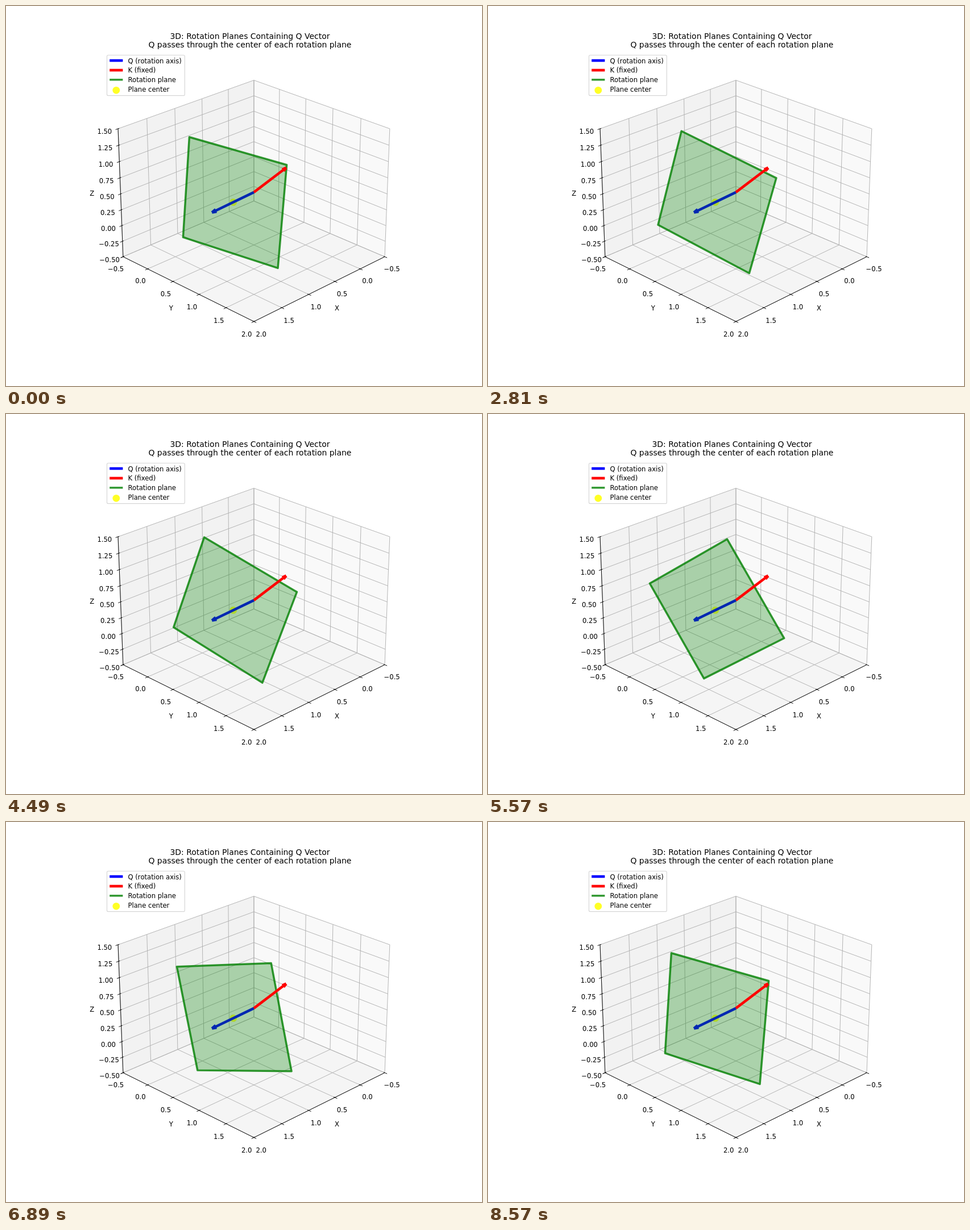
Write an HTML page that moves like this. It is 837 by 669 pixels and loops after 9690 ms.

```html
<!DOCTYPE html>
<html lang="en">
<head>
<meta charset="utf-8">
<title>Rotation planes</title>
<style>
  html, body { margin: 0; width: 100%; height: 100%; overflow: hidden; background: #fff; }
  svg { display: block; width: 837px; height: 669px; }
  text { font: 11.625px "DejaVu Sans", sans-serif; fill: #000; }
  .mid { text-anchor: middle; }
  .title { font-size: 13.95px; text-anchor: middle; }
  .grid { fill: none; stroke: #b0b0b0; stroke-width: .93; }
  .axis { fill: none; stroke: #000; stroke-width: .93; }
  .arrow { fill: none; stroke-width: 4.65; }
  .edge { fill: none; stroke: #008000; stroke-opacity: .8; stroke-width: 3.49; stroke-linejoin: round; }
</style>
</head>
<body>
<svg id="stage" viewBox="0 0 837 669"></svg>
<script>
const stage = document.getElementById('stage');
const LO = -0.5, HI = 2, TOP = 1.5;
const ELEV = 25 * Math.PI / 180, SIN = Math.sin(ELEV), COS = Math.cos(ELEV);
const Q = [1, 0.2, 0.1], K = [0, 0.62, 0.61];

function add(tag, attrs, text) {
  const el = document.createElementNS('http://www.w3.org/2000/svg', tag);
  for (const name in attrs) el.setAttribute(name, attrs[name]);
  if (text) el.textContent = text;
  return stage.appendChild(el);
}

// Perspective camera at azimuth 45 degrees
function project([x, y, z]) {
  const u = 0.8 * x - 0.6, v = 0.8 * y - 0.6, h = 0.75 * z - 0.375;
  const side = (v - u) / Math.SQRT2, near = (u + v) / Math.SQRT2;
  const scale = 2784.5 / (16.8 - near * COS - h * SIN);
  return [435.92 + side * scale, 330.87 - (h * COS - near * SIN) * scale];
}

const points = list => list.map(p => project(p).map(n => n.toFixed(2)).join()).join(' ');
const line = (cls, ...list) => add('polyline', { class: cls, points: points(list) });
const label = (x, y, text, cls = 'mid') => add('text', { x, y, class: cls }, text);
const number = (v, digits) => v.toFixed(digits).replace('-', '\u2212');

function pane(fill, ...list) {
  add('polygon', { fill, points: points(list) });
}

function drawBox() {
  pane('#f9f9f9', [LO, LO, LO], [LO, HI, LO], [LO, HI, TOP], [LO, LO, TOP]);
  pane('#f2f2f2', [LO, LO, LO], [HI, LO, LO], [HI, LO, TOP], [LO, LO, TOP]);
  pane('#f5f5f5', [LO, LO, LO], [HI, LO, LO], [HI, HI, LO], [LO, HI, LO]);

  const flat = Array.from({ length: 6 }, (_, i) => LO + i / 2);
  const tall = Array.from({ length: 9 }, (_, i) => LO + i / 4);
  for (const t of flat) {
    line('grid', [t, HI, LO], [t, LO, LO], [t, LO, TOP]);
    line('grid', [HI, t, LO], [LO, t, LO], [LO, t, TOP]);
  }
  for (const t of tall) line('grid', [HI, LO, t], [LO, LO, t], [LO, HI, t]);

  line('axis', [LO, HI, LO], [HI, HI, LO]);
  line('axis', [HI, LO, LO], [HI, HI, LO]);
  line('axis', [HI, LO, LO], [HI, LO, TOP]);

  const out = HI + 0.0417, back = HI - 0.0208;
  for (const t of flat) {
    line('axis', [t, out, LO], [t, back, LO]);
    line('axis', [out, t, LO], [back, t, LO]);
    const drop = 25.1 + 0.7 * (t - LO);
    const [xr, yr] = project([t, HI, LO]);
    const [xl, yl] = project([HI, t, LO]);
    label(xr + 12.7, yr + drop, number(t, 1));
    label(xl - 12.7, yl + drop, number(t, 1));
  }
  for (const t of tall) {
    line('axis', [out, LO, t], [back, LO, t]);
    const [x, y] = project([HI, LO, t]);
    label(x - 23.7, y + 9.1, number(t, 2));
  }
  label(582, 536.3, 'X');
  label(290.3, 536.3, 'Y');
  label(151.3, 334.3, 'Z');
}

function drawArrow(tip3, stroke) {
  const tail = project([0, 0, 0]), tip = project(tip3);
  const dx = (tail[0] - tip[0]) * 0.1, dy = (tail[1] - tip[1]) * 0.1;
  const wing = s => `M${tip} l${dx - s * dy * 0.27} ${dy + s * dx * 0.27}`;
  add('path', { class: 'arrow', stroke, d: `M${tail} L${tip} ${wing(1)} ${wing(-1)}` });
}

function drawLegend() {
  add('rect', { x: 177.5, y: 86.5, width: 136.8, height: 71.2, rx: 2.3,
    fill: '#fff', 'fill-opacity': .8, stroke: '#ccc', 'stroke-opacity': .8, 'stroke-width': 1.16 });
  const key = (y, attrs) => add('path', { d: `M182.2 ${y}h23.2`, ...attrs });
  key(96, { class: 'arrow', stroke: '#00f' });
  key(113, { class: 'arrow', stroke: '#f00' });
  key(129.8, { class: 'edge' });
  add('circle', { cx: 193.8, cy: 148.3, r: 6.4, fill: '#ff0', 'fill-opacity': .85 });
  ['Q (rotation axis)', 'K (fixed)', 'Rotation plane', 'Plane center']
    .forEach((text, i) => label(214.5, 100.5 + 16.9 * i, text, ''));
}

drawBox();
const [cx, cy] = project(Q.map(n => n / 2));
add('circle', { cx, cy, r: 6.4, fill: '#ff0', 'fill-opacity': .75 });
drawArrow(Q, '#00f');
const fill = add('polygon', { fill: '#008000', 'fill-opacity': .3 });
const edge = add('polygon', { class: 'edge' });
drawArrow(K, '#f00');
label(428.96, 58, '3D: Rotation Planes Containing Q Vector', 'title');
label(428.96, 73.3, 'Q passes through the center of each rotation plane', 'title');
drawLegend();

// Unit vectors spanning the plane perpendicular to Q
const len = Math.hypot(...Q), flatLen = Math.hypot(Q[0], Q[1]);
const n = Q.map(c => c / len);
const e1 = [Q[1] / flatLen, -Q[0] / flatLen, 0];
const e2 = [e1[1] * n[2], -e1[0] * n[2], e1[0] * n[1] - e1[1] * n[0]];

const LOOP = 9690, START = 1370, STEP = 120, TURNS = 59;
const RADIUS = 0.8 * Math.SQRT2;

function draw(now) {
  const t = now % LOOP;
  const step = t < START ? 0 : Math.min(TURNS, Math.floor((t - START) / STEP) + 1);
  const angle = (46 - 360 * step / TURNS) * Math.PI / 180;
  const corners = [0, 1, 2, 3].map(i => {
    const a = RADIUS * Math.cos(angle + i * Math.PI / 2);
    const b = RADIUS * Math.sin(angle + i * Math.PI / 2);
    return Q.map((c, j) => c / 2 + a * e1[j] + b * e2[j]);
  });
  const shape = points(corners);
  fill.setAttribute('points', shape);
  edge.setAttribute('points', shape);
}

function tick() {
  draw(performance.now());
  requestAnimationFrame(tick);
}
tick();
</script>
</body>
</html>
```
